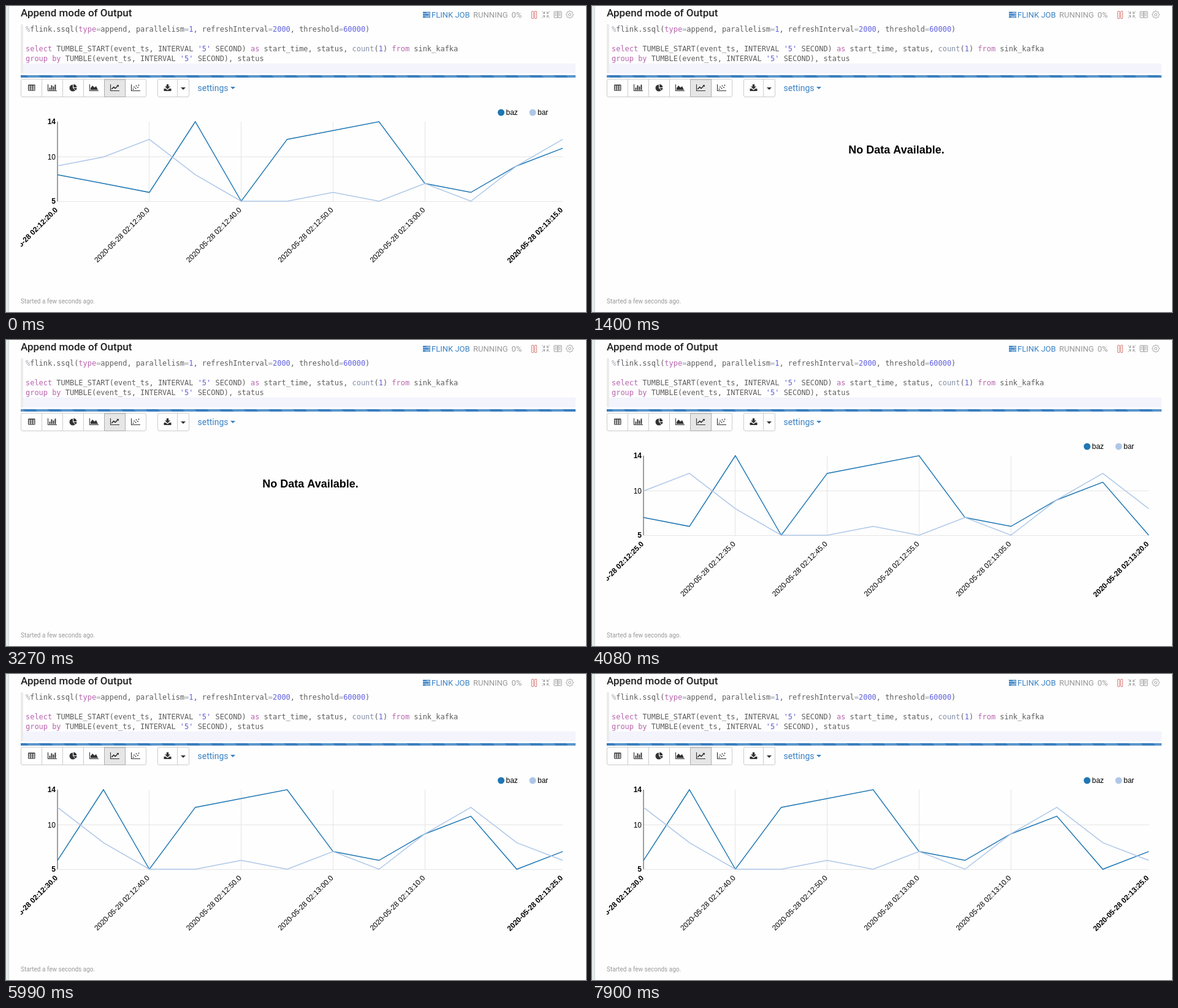
An HTML page with a canvas for the animation above (8000 ms loop, 946 by 500 pixels).

```html
<!DOCTYPE html>
<html lang="en">
<head>
<meta charset="utf-8">
<title>Append mode of Output</title>
<style>
html, body { margin: 0; width: 100%; height: 100%; overflow: hidden; background: #fefefe; }
canvas { display: block; width: 946px; height: 500px; }
</style>
</head>
<body>
<canvas id="stage"></canvas>
<script>
const W = 946, H = 500, LOOP = 8000;
const canvas = document.getElementById('stage');
const ctx = canvas.getContext('2d');
const dpr = window.devicePixelRatio || 1;
canvas.width = W * dpr;
canvas.height = H * dpr;

const ROBOTO = 'Roboto, sans-serif';
const ARIAL = '"Liberation Sans", Arial, sans-serif';
const MONO = '"DejaVu Sans Mono", monospace';
const LINK = '#3a82c4', ICON = '#333', MUTED = '#999';

const series = [
  { name: 'baz', color: '#1f77b4', x: 807.5, data: [8, 7, 6, 14, 5, 12, 13, 14, 7, 6, 9, 11, 5, 7] },
  { name: 'bar', color: '#aec7e8', x: 859, data: [9, 10, 12, 8, 5, 5, 6, 5, 7, 5, 9, 12, 8, 6] }
];
// [start ms, data offset]; an offset of -1 is the empty view
const schedule = [[0, 0], [1400, -1], [1540, 1], [3270, -1], [3420, 1],
                  [5140, -1], [5410, 2], [7140, -1], [7280, 2]];

function text(str, x, y, font, color, align = 'left') {
  ctx.font = font;
  ctx.fillStyle = color;
  ctx.textAlign = align;
  ctx.fillText(str, x, y);
}

function rect(x, y, w, h, color) {
  ctx.fillStyle = color;
  ctx.fillRect(x, y, w, h);
}

function path(points, close) {
  ctx.beginPath();
  points.forEach(([x, y]) => ctx.lineTo(x, y));
  if (close) ctx.closePath();
}

function line(points, color, width = 1) {
  path(points);
  ctx.strokeStyle = color;
  ctx.lineWidth = width;
  ctx.stroke();
}

function poly(points, color) {
  path(points, true);
  ctx.fillStyle = color;
  ctx.fill();
}

function disc(x, y, r, color) {
  ctx.beginPath();
  ctx.arc(x, y, r, 0, Math.PI * 2);
  ctx.fillStyle = color;
  ctx.fill();
}

function ring(x, y, r, color, width = 1) {
  ctx.beginPath();
  ctx.arc(x, y, r, 0, Math.PI * 2);
  ctx.strokeStyle = color;
  ctx.lineWidth = width;
  ctx.stroke();
}

function box(x, y, w, h, r, fill, stroke) {
  ctx.beginPath();
  ctx.roundRect(x, y, w, h, r);
  if (fill) { ctx.fillStyle = fill; ctx.fill(); }
  if (stroke) { ctx.strokeStyle = stroke; ctx.lineWidth = 1; ctx.stroke(); }
}

const caret = (x, y, color) => poly([[x - 4, y], [x + 4, y], [x, y + 4]], color);

// Code editor
const tokenRules = [
  [/^'[^']*'$/, '#5f5fd6'],
  [/^\d+$/, '#5f5fe0'],
  [/^(select|as|from|group|by|type)$/, '#b863ad'],
  [/^count$/, '#858fa6'],
  [/^[%=]$/, '#9ea7b2']
];

function codeLine(str, y) {
  const font = '11.96px ' + MONO;
  let x = 32;
  for (const token of str.match(/'[^']*'|\w+|\s+|[^\w\s]/g)) {
    const rule = tokenRules.find(([pattern]) => pattern.test(token));
    text(token, x, y, font, rule ? rule[1] : '#5e5e5e');
    x += ctx.measureText(token).width;
  }
}

function drawEditor() {
  rect(24, 30, 4, 80, '#ebebeb');
  rect(28, 94, 901, 16, '#f3f4fc');
  codeLine('%flink.ssql(type=append, parallelism=1, refreshInterval=2000, threshold=60000)', 42);
  codeLine("select TUMBLE_START(event_ts, INTERVAL '5' SECOND) as start_time, status, count(1) from sink_kafka", 74);
  codeLine("group by TUMBLE(event_ts, INTERVAL '5' SECOND), status", 90);
}

// Header with status icons
function drawHeader() {
  text('Append mode of Output', 24, 17, '500 17px ' + ROBOTO, '#212121');
  [9.5, 13, 16.5].forEach((y, i) => {
    rect(680, y, 12, 2.7, LINK);
    rect([686, 689, 684][i], y + 0.9, [5, 2, 7][i], 0.9, '#cfe0f0');
  });
  const font = '13px ' + ROBOTO;
  text('FLINK JOB', 694, 19, font, LINK);
  text('RUNNING', 762, 19, font, MUTED);
  text('0%', 824.5, 19, font, MUTED);

  for (const x of [857.5, 862.5]) box(x, 8.5, 3, 12, 0.5, null, '#d97b76');

  for (const sx of [-1, 1]) for (const sy of [-1, 1]) {
    const at = (dx, dy) => [880.5 + sx * dx, 14 + sy * dy];
    line([at(6, 5.5), at(2, 1.8)], MUTED);
    line([at(5, 1.8), at(2, 1.8), at(2, 5)], MUTED);
  }

  for (const x of [894, 900]) {
    box(x, 9, 6, 10, 0.5, null, MUTED);
    for (const y of [11.5, 13.5, 15.5]) line([[x + 1.5, y], [x + 4.5, y]], MUTED, 0.8);
  }

  const teeth = [];
  for (let i = 0; i < 32; i++) {
    const angle = (i - 0.5) / 32 * Math.PI * 2;
    const r = i % 4 < 2 ? 6 : 4.7;
    teeth.push([919.5 + r * Math.cos(angle), 14 + r * Math.sin(angle)]);
  }
  path(teeth, true);
  ctx.strokeStyle = MUTED;
  ctx.lineWidth = 0.9;
  ctx.stroke();
  ring(919.5, 14, 2, MUTED, 0.9);
}

// Moving stripes: 40 px period, one period every 2 s
function drawProgress(t) {
  const x0 = 24, y0 = 113, w = 905, h = 4;
  rect(x0, y0, w, h, '#3a7ebf');
  ctx.save();
  ctx.beginPath();
  ctx.rect(x0, y0, w, h);
  ctx.clip();
  const shift = (((9 - t / 50) % 40) + 40) % 40;
  for (let x = x0 + shift - 40; x < x0 + w; x += 40) {
    poly([[x, y0], [x + 20, y0], [x + 20 + h, y0 + h], [x + h, y0 + h]], '#5b95cb');
  }
  ctx.restore();
}

// Toolbar
function chartAxes(x) {
  line([[x - 7, 128], [x - 7, 138.5], [x + 7.5, 138.5]], ICON, 1.1);
}

const icons = [
  x => {
    box(x - 5.5, 128.5, 11.5, 10, 1, ICON);
    for (let c = 0; c < 3; c++) for (let r = 0; r < 3; r++) {
      rect(x - 4.5 + c * 3.5, 130.4 + r * 2.6, 2.5, 1.7, '#fff');
    }
  },
  x => {
    chartAxes(x);
    [4, 8, 6, 9].forEach((h, i) => rect(x - 5 + i * 3, 137.5 - h, 1.9, h, ICON));
  },
  x => {
    const wedge = (cx, cy, r, from, to) => {
      ctx.beginPath();
      ctx.moveTo(cx, cy);
      ctx.arc(cx, cy, r, from * Math.PI, to * Math.PI);
      ctx.fillStyle = ICON;
      ctx.fill();
    };
    wedge(x - 0.5, 134, 5.5, 0.25, 1.5);
    wedge(x + 0.5, 134, 5.5, 0, 0.25);
    wedge(x + 0.6, 133, 5.2, 1.5, 2);
  },
  x => {
    chartAxes(x);
    poly([[x - 5.5, 137.3], [x - 5.5, 134], [x - 2.5, 130], [x + 0.8, 133.2], [x + 3.5, 131], [x + 6.5, 137.3]], ICON);
  },
  x => {
    chartAxes(x);
    line([[x - 5.3, 136], [x - 1.8, 132.4], [x + 0.6, 134.6], [x + 5, 130.2]], ICON, 1.6);
    poly([[x + 2.8, 129], [x + 6.4, 129], [x + 6.4, 132.6]], ICON);
  },
  x => {
    chartAxes(x);
    for (const [dx, y] of [[-4, 136], [-2.5, 132.5], [0, 134.5], [1, 130.5], [3.5, 133], [5, 129.5]]) {
      disc(x + dx, y, 0.9, ICON);
    }
  }
];

function drawToolbar() {
  box(24.5, 119.5, 204, 29, 2.5, '#fff', '#ccc');
  for (let i = 1; i < 6; i++) rect(24 + i * 34, 120, 1, 29, '#ccc');
  box(160.5, 119.5, 34, 29, 0, '#e6e6e6', '#adadad');
  rect(161, 120, 33, 2, '#d9d9d9');
  icons.forEach((draw, i) => draw(41.5 + i * 34));

  box(247.5, 119.5, 51, 29, 2.5, '#fff', '#ccc');
  rect(279, 120, 1, 29, '#ccc');
  rect(261.8, 128, 3.4, 4, ICON);
  poly([[259, 131.5], [268, 131.5], [263.5, 136]], ICON);
  poly([[257.5, 135], [260.5, 135], [263.5, 137.5], [266.5, 135], [269.5, 135], [269.5, 139], [257.5, 139]], ICON);
  caret(289, 133, ICON);

  text('settings', 312.5, 139, '14px ' + ROBOTO, LINK);
  caret(370, 132, LINK);
}

// Line chart
const LEFT = 84, RIGHT = 908, TOP = 189, BOTTOM = 319, LAST = 11;
const px = i => LEFT + (RIGHT - LEFT) * i / LAST;
const py = v => BOTTOM - (BOTTOM - TOP) * (v - 5) / 9;

function timeLabel(step) {
  const seconds = 12 * 60 + 20 + step * 5;
  const pad = n => String(n).padStart(2, '0');
  return `2020-05-28 02:${pad(Math.floor(seconds / 60))}:${pad(seconds % 60)}.0`;
}

function drawChart(offset) {
  const plain = '12px ' + ARIAL, bold = 'bold 12px ' + ARIAL;
  for (const s of series) {
    disc(s.x, 174, 5.5, s.color);
    text(s.name, s.x + 8, 178, plain, '#000');
  }

  for (const i of [2, 4, 6, 8]) rect(Math.floor(px(i)), TOP, 1, BOTTOM - TOP, '#e5e5e5');
  for (const v of [10, 5]) rect(LEFT, Math.floor(py(v)), RIGHT - LEFT, 1, '#e5e5e5');
  rect(LEFT - 0.5, TOP, 1, BOTTOM - TOP, '#404040');
  for (const v of [14, 10, 5]) text(v, 81, py(v) + 4, v === 10 ? plain : bold, '#000', 'right');

  ctx.save();
  ctx.beginPath();
  ctx.rect(24, 150, 905, 300);
  ctx.clip();
  for (const i of [0, 2, 4, 6, 8, LAST]) {
    ctx.save();
    ctx.translate(px(i) + 1, 334);
    ctx.rotate(-Math.PI / 4);
    text(timeLabel(i + offset), 0, 0, i % LAST ? plain : bold, '#000', 'right');
    ctx.restore();
  }
  ctx.restore();

  for (const s of series) {
    const shown = s.data.slice(offset, offset + LAST + 1);
    line(shown.map((v, i) => [px(i), py(v)]), s.color, 1.5);
  }
}

function draw(t) {
  ctx.setTransform(dpr, 0, 0, dpr, 0, 0);
  rect(0, 0, W, H, '#fefefe');
  rect(0, 0, 4, H, '#e6ebec');
  rect(4, 0, 1, H, '#d3d8d9');
  drawHeader();
  drawEditor();
  drawProgress(t);
  drawToolbar();
  const offset = schedule.filter(([start]) => start <= t).pop()[1];
  if (offset < 0) text('No Data Available.', 496.5, 241, 'bold 18px ' + ARIAL, '#000', 'center');
  else drawChart(offset);
  text('Started a few seconds ago.', 24, 486, '10px ' + ROBOTO, MUTED);
}

const begin = performance.now();
function tick() {
  draw((performance.now() - begin) % LOOP);
  requestAnimationFrame(tick);
}
tick();
</script>
</body>
</html>
```
